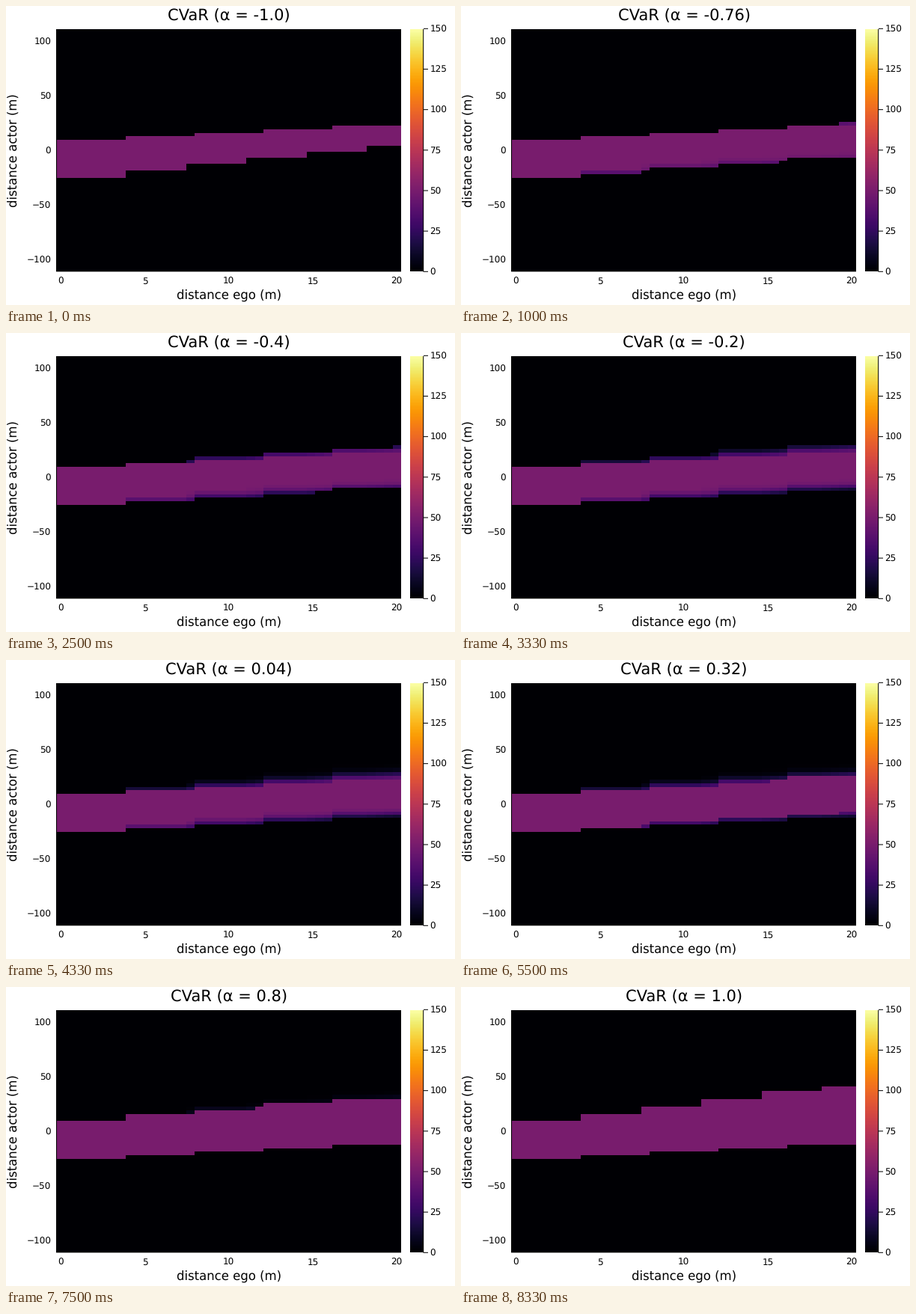
Write a matplotlib script that moves like this. It is 600x400 px and loops after 8490 ms.

```python
import numpy as np
import matplotlib.pyplot as plt
from matplotlib.animation import FuncAnimation

plt.rcParams.update({"font.family": "DejaVu Sans", "text.hinting": "none"})
WIDTH, HEIGHT, DPI = 600, 400, 100
FRAMES, LOOP_MS = 51, 8490
LEFT, RIGHT, TOP, BOTTOM = 68, 528, 31, 355
COST, MAX_COST, COLUMNS = 50, 150, 40
ACTOR_ROWS, ACTOR_SPAN = 21, 12

# Actor distances are spaced more widely the farther they are from the middle.
steps = np.arange(-8, ACTOR_ROWS - 7)
row_heights = np.round(195 - 3.7 * steps - .083 * steps * abs(steps))
row_edges = np.r_[BOTTOM, row_heights, TOP]
column_edges = np.ceil(np.linspace(LEFT, RIGHT, COLUMNS + 1))


def collision_probability(row, col):
    """Chance that the actor, at an uncertain shift, covers this row."""
    step, late_step = col // 8, max(0, (col - 1) // 7)
    if 2 * late_step <= row < ACTOR_SPAN + step:
        return 1
    if not step <= row < ACTOR_SPAN + 2 * late_step:
        return 0
    lateness = max(0, col - 7 * (step + 1)) / step
    shift = 1.65 * (step * (1.62 - .056 * step) - 1.18) + .53 * lateness
    if row < ACTOR_SPAN:
        logit = 1.65 * row - shift
    else:
        logit = shift - 1.65 * (row - ACTOR_SPAN)
    return 1 / (1 + np.exp(-logit - .16))


prob = np.zeros((len(row_edges) - 1, COLUMNS))
for row in range(ACTOR_ROWS):
    for col in range(COLUMNS):
        prob[row + 1, col] = collision_probability(row, col)


def cvar(alpha):
    """Mean cost beyond the quantile: the upper tail for alpha >= 0, else the lower."""
    mean = COST * prob
    if alpha >= 0:
        return np.where((prob > 0) & (prob >= 1 - alpha), COST, mean)
    return np.where((prob == 1) | (prob > -alpha), mean, 0)


fig = plt.figure(figsize=(WIDTH / DPI, HEIGHT / DPI), dpi=DPI, facecolor="white")
ax = fig.add_axes([0, 0, 1, 1])
ax.axis("off")


def label(x, y, text, px, **kw):
    kw = {"ha": "center", "va": "baseline", **kw}
    return ax.text(x, y, text, fontsize=px * 72 / DPI, color="black", **kw)


def line(xs, ys):
    ax.plot(xs, ys, color="black", lw=72 / DPI, solid_capstyle="butt", snap=False)


mesh = ax.pcolormesh(column_edges, row_edges, cvar(-1), cmap="inferno", vmin=0,
                     vmax=MAX_COST, antialiased=False, linewidth=0)
ax.imshow(np.linspace(1, 0, 256)[:, None], cmap="inferno", aspect="auto",
          extent=(540, 558, BOTTOM, TOP), interpolation="nearest")
ax.set(xlim=(0, WIDTH), ylim=(HEIGHT, 0))

line((67.5, 67.5), (TOP, BOTTOM))
line((67, RIGHT), (354.9, 354.9))
line((557.7, 557.7), (TOP, BOTTOM + .5))

for x in range(0, 21, 5):
    label(73.4 + 22.43 * x, 372, str(x), 12)
for y in range(-100, 101, 50):
    label(60.3, 198 - 1.46 * y, str(y).replace("-", "\u2212"), 12, ha="right")
for value in range(0, MAX_COST + 1, 25):
    y = BOTTOM + .3 - value * 325 / MAX_COST
    line((558, 564), (y, y))
    label(566.4, y + 4.4, str(value), 12, ha="left")

label(298, 392.6, "distance ego (m)", 16.5)
label(16.2, 193, "distance actor (m)", 16.5, rotation=90, rotation_mode="anchor")
title = label(298.2, 18.8, "", 21)


def update(frame):
    alpha = (frame - 25) / 25
    mesh.set_array(cvar(alpha))
    title.set_text(f"CVaR (α = {alpha})")
    return mesh, title


anim = FuncAnimation(fig, update, frames=FRAMES, interval=LOOP_MS / FRAMES,
                     repeat=True, repeat_delay=0)
plt.show()
```
